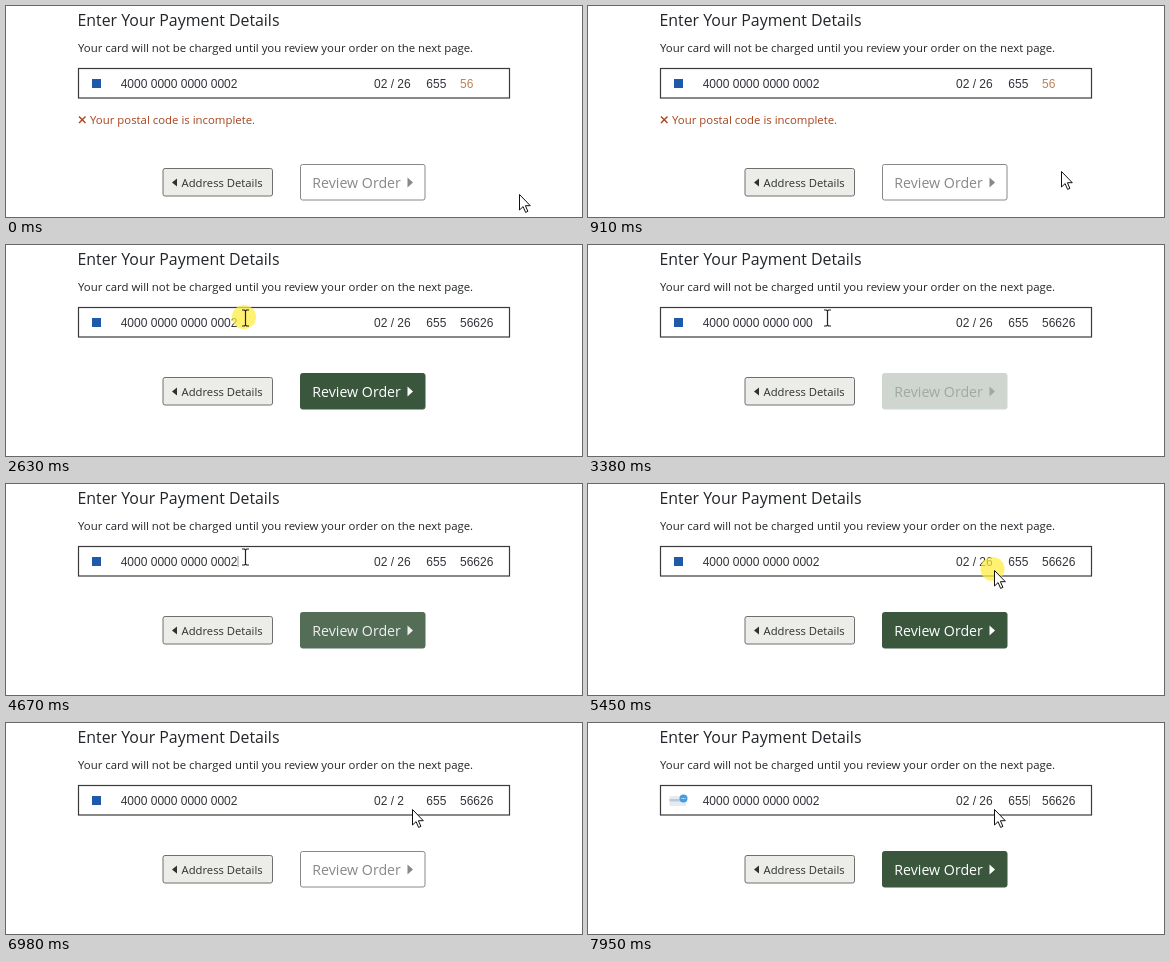
Recreate the animation shown at these times as an HTML page. Size 576 by 211 pixels, loop 8000 ms.

```html
<!DOCTYPE html>
<html lang="en">
<head>
<meta charset="utf-8">
<title>Payment form</title>
<style>
html, body { margin: 0; width: 100%; height: 100%; overflow: hidden; background: #fff; }
svg { display: block; width: 576px; height: 211px; }
text { font-family: "Open Sans", "Noto Sans", sans-serif; font-size: 11.4px; fill: #212529; white-space: pre; }
.field text { font-family: "Liberation Sans", Arial, sans-serif; font-size: 12px; fill: #32343a; }
</style>
</head>
<body>
<svg viewBox="0 0 576 211">
  <text x="71.5" y="20" style="font-size:15.9px">Enter Your Payment Details</text>
  <text x="72" y="46">Your card will not be charged until you review your order on the next page.</text>

  <g class="field">
    <rect x="72.5" y="62.5" width="431" height="29.5" fill="#fff" stroke="#3a3a3a" stroke-width="1.2"/>
    <rect id="brand" x="86" y="73" width="9" height="9" fill="#1f5aa8"/>
    <g id="cvcIcon">
      <rect x="81.500" y="73" width="16.500" height="10" rx="1" fill="#e6ebf1"/>
      <rect x="81.500" y="76" width="16.500" height="2.500" fill="#b9cadb"/>
      <circle cx="95.500" cy="75.500" r="4" fill="#4a9bdb"/>
      <path d="M93.500 75.500h4" stroke="#d8ecfa" stroke-width="1.200" stroke-dasharray="1 .5"/>
    </g>
    <text id="card" x="114.700" y="82"></text>
    <text id="expiry" x="368" y="82"></text>
    <text x="420.300" y="82">655</text>
    <text id="postal" x="454" y="82"></text>
    <path id="caret" d="M0 72v11" stroke="#777" stroke-width="1"/>
  </g>

  <g id="error">
    <path d="M73 110.500l6.500 6.500m0-6.500l-6.500 6.500" stroke="#a8431a" stroke-width="1.400"/>
    <text x="84" y="118" style="fill:#a8431a">Your postal code is incomplete.</text>
  </g>

  <g id="buttons">
    <rect x="157" y="132.500" width="109.500" height="27.500" rx="2" fill="#ecece8" stroke="#6c716c"/>
    <path d="M171 142.500v8l-5-4z" fill="#2d332e"/>
    <text x="175.600" y="151" style="font-size:11.25px;fill:#2d332e">Address Details</text>
    <rect id="review" x="294.500" y="128.500" width="124.500" height="35.500" rx="2"/>
    <g id="reviewLabel">
      <path d="M401.500 141.500v10l5.500-5z"/>
      <text x="306.300" y="152" style="font-size:14.2px;fill:inherit">Review Order</text>
    </g>
  </g>

  <circle id="click" r="12" fill="#ffeb3b"/>
  <path id="arrow" d="M.5.5v15.500l3.600-3.400 2.500 5.800 2.300-1-2.500-5.700h4.900z" fill="#fff" stroke="#111" stroke-width="1"/>
  <path id="beam" d="M-3.500-8h2.500l1 1 1-1h2.500M0-7v14M-3.500 8h2.500l1-1 1 1h2.500" fill="none" stroke="#222" stroke-width="1.200"/>
</svg>
<script>
const LOOP = 8000;
const GREEN = [58, 87, 62], WHITE = [255, 255, 255], GRAY = [136, 136, 136];
const el = id => document.getElementById(id);
const clamp = x => Math.max(0, Math.min(1, x));
const ramp = (t, a, b) => clamp((t - a) / (b - a));
const smooth = x => x * x * (3 - 2 * x);
const mix = (a, b, p) => `rgb(${a.map((v, i) => Math.round(v + (b[i] - v) * p))})`;
const set = (node, attrs) => { for (const k in attrs) node.setAttribute(k, attrs[k]); };
const at = (t, steps) => steps.reduce((v, [time, next]) => t >= time ? next : v, null);

// Each move: start, end, destination
const START = [513, 188];
const MOVES = [[30, 610, [473, 165]], [2150, 2450, [239.5, 73]], [4970, 5210, [406, 86]]];
// Each toggle: time, button enabled
const TOGGLES = [[1440, 1], [3310, 0], [4580, 1], [6310, 0], [7460, 1]];
const CARETS = [[380, 910], [1440, 1970], [2660, 3140], [3620, 4070], [4580, 4970],
                [5620, 6040], [6500, 6980], [7700, LOOP]];

function pointer(t) {
  let p = START;
  for (const [a, b, to] of MOVES) {
    const k = smooth(ramp(t, a, b));
    p = p.map((v, i) => v + (to[i] - v) * k);
  }
  return p;
}

function enabled(t) {
  let level = 0;
  for (const [time, on] of TOGGLES) {
    const k = 1 - Math.pow(1 - ramp(t, time, time + 150), 2.2);
    level += (on - level) * k;
  }
  return level;
}

function render(t) {
  const invalid = t < 1240;
  el('card').textContent = '4000 0000 0000 000' + (t >= 3310 && t < 4580 ? '' : '2');
  el('expiry').textContent = '02 / 2' + (t >= 6310 && t < 7460 ? '' : '6');
  el('postal').textContent = at(t, [[0, '56'], [1240, '566'], [1340, '5662'], [1440, '56626']]);
  el('postal').style.fill = invalid ? '#bd8258' : '';
  set(el('error'), { visibility: invalid ? 'visible' : 'hidden' });
  set(el('buttons'), { transform: `translate(0 ${invalid ? 30 : 0})` });

  const on = enabled(t);
  const fill = mix(WHITE, GREEN, on);
  const outline = 1 - ramp(on, 0, 0.2);
  set(el('review'), { fill, stroke: outline > 0 ? mix([205, 212, 206], GRAY, outline) : fill });
  set(el('reviewLabel'), { fill: mix(GRAY, WHITE, on) });

  const flip = ramp(t, 7600, 7800);
  set(el('brand'), { opacity: 1 - flip });
  set(el('cvcIcon'), { opacity: flip });

  const caretX = t < 2630 ? (t < 1440 ? 468 : 488)
    : t < 5450 ? (t >= 3310 && t < 4580 ? 225.5 : 232)
    : t < 7460 ? (t >= 6310 ? 399 : 405.5) : 441.5;
  const caretOn = CARETS.some(([a, b]) => t >= a && t < b);
  set(el('caret'), { transform: `translate(${caretX} 0)`, opacity: caretOn ? 0.8 : 0 });

  const [x, y] = pointer(t);
  const overText = y < 92 && x < 362;
  const place = `translate(${x.toFixed(1)} ${y.toFixed(1)})`;
  set(el('arrow'), { transform: place, opacity: overText ? 0 : 1 });
  set(el('beam'), { transform: place, opacity: overText ? 1 : 0 });

  const glow = t >= 2630 && t < 2690 ? 1 : t >= 5450 ? 1 - ramp(t, 5500, 5620) : 0;
  set(el('click'), { cx: x - 1.5, cy: y - 1, opacity: glow * 0.72 });
}

function tick() {
  render(performance.now() % LOOP);
  requestAnimationFrame(tick);
}
tick();
</script>
</body>
</html>
```
